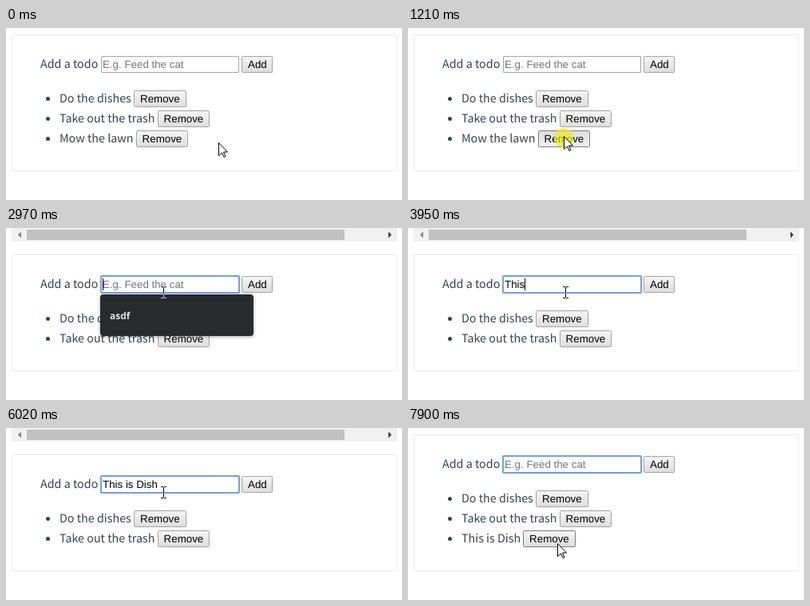
Animation of 496 by 215 pixels, one loop 8000 ms. Source, as an HTML page with a canvas:

```html
<!DOCTYPE html>
<html lang="en">
<head>
<meta charset="utf-8">
<title>Todo list demo</title>
<style>
  html, body { margin: 0; width: 100%; height: 100%; overflow: hidden; background: #fff; }
  canvas { display: block; }
</style>
</head>
<body>
<canvas id="stage" width="496" height="215"></canvas>
<script>
const ctx = document.getElementById('stage').getContext('2d');
const LOOP = 8000;
const BODY = '14.32px "Noto Sans CJK SC", "Noto Sans CJK JP", "Noto Sans", sans-serif';
const UI = '13.333px "Liberation Sans", Arial, sans-serif';
const MENU = 'bold 12px "Open Sans", "Noto Sans", sans-serif';
const INK = '#304455';
const BUTTON_W = 65.6;

const dishes = { text: 'Do the dishes', x: 160 };
const trash = { text: 'Take out the trash', x: 189.6 };
const lawn = { text: 'Mow the lawn', x: 162.6 };
const added = { text: 'This is Dish', x: 144.1 };

// Time of each keystroke and how many letters are then in the field
const TYPED = [[3300, 1], [3730, 3], [3950, 4], [4170, 5], [4390, 6], [4500, 7],
  [4610, 8], [4940, 9], [5040, 10], [5260, 11], [5590, 12]];
const REMOVED = 1310, FOCUSED = 1870, SUBMITTED = 6250;

const between = (t, a, b) => t >= a && t < b;

function write(text, x, y, font, color) {
  ctx.font = font;
  ctx.fillStyle = color;
  ctx.fillText(text, x, y);
}

function box(x, y, w, h, radius, fill, stroke) {
  ctx.beginPath();
  ctx.roundRect(x + .5, y + .5, w - 1, h - 1, radius);
  ctx.fillStyle = fill;
  ctx.fill();
  ctx.lineWidth = 1;
  ctx.strokeStyle = stroke;
  ctx.stroke();
}

function polygon(points, x, y) {
  ctx.beginPath();
  for (const [px, py] of points) ctx.lineTo(x + px, y + py);
  ctx.closePath();
}

// Pointer travel recorded as a few discrete hops along an eased line
function travel(t, start, end, hops, from, to) {
  const hop = Math.floor((t - start) / (end - start) * (hops - 1) + .01) + 1;
  const p = Math.min(Math.max(hop / hops, 0), 1);
  const eased = p * p * (3 - 2 * p);
  return from.map((v, i) => Math.round(v + (to[i] - v) * eased));
}

function pointerAt(t) {
  if (t < 100) return [266, 143];
  if (t < 1420) return travel(t, 310, 990, 7, [92, 20], [195, 135]);
  if (t < 1530) return [196, 108];
  if (t < 7120) return [197, 80];
  return travel(t, 7120, 7900, 8, [197, 80], [187, 144]);
}

function button(label, x, y, w, pointer, down) {
  const left = Math.round(x), right = Math.round(x + w);
  const hover = between(pointer[0], left, right) && between(pointer[1], y, y + 21);
  const pressed = hover && down;
  const shade = ctx.createLinearGradient(0, y, 0, y + 21);
  shade.addColorStop(0, pressed ? '#dcdcdc' : '#f6f6f6');
  shade.addColorStop(1, pressed ? '#f2f2f2' : '#dddddd');
  box(left, y, right - left, 21, 1, shade, hover ? '#7c7c7c' : '#a3a3a3');
  write(label, x + 8, y + 15, UI, '#000');
}

function scrollbar() {
  ctx.fillStyle = '#f1f1f1';
  ctx.fillRect(7, 0, 483, 17);
  ctx.fillStyle = '#c1c1c1';
  ctx.fillRect(26, 2, 398, 13);
  ctx.fillStyle = '#858585';
  polygon([[0, 0], [4, -4], [4, 4]], 15, 8.5);
  ctx.fill();
  ctx.fillStyle = '#404040';
  polygon([[0, -4], [4, 0], [0, 4]], 479, 8.5);
  ctx.fill();
}

function caretVisible(t) {
  if (t < FOCUSED) return false;
  if (t >= SUBMITTED) return Math.floor((t - SUBMITTED) / 550) % 2 === 0;
  return !between(t, 2420, 2970) && t < 6020;
}

function field(t, y) {
  const key = t < SUBMITTED && TYPED.findLast(([time]) => t >= time);
  const text = key ? added.text.slice(0, key[1]) : '';
  box(119, y, 173, 21, 0, '#fff', '#a6a6a6');
  if (t >= FOCUSED) {
    ctx.beginPath();
    ctx.roundRect(119, y, 173, 21, 1);
    ctx.lineWidth = 2;
    ctx.strokeStyle = '#719fe3';
    ctx.stroke();
  }
  write(text || 'E.g. Feed the cat', 121, y + 15, UI, text ? '#000' : '#757575');
  if (caretVisible(t)) {
    ctx.fillStyle = '#000';
    ctx.fillRect(Math.round(121 + ctx.measureText(text).width) - (text ? 0 : 0), y + 3, 1, 15);
  }
}

function suggestions() {
  ctx.save();
  ctx.shadowColor = 'rgba(0,0,0,.35)';
  ctx.shadowBlur = 4;
  ctx.shadowOffsetY = 1;
  ctx.fillStyle = '#292a2d';
  ctx.beginPath();
  ctx.roundRect(118, 83, 192, 52, 4);
  ctx.fill();
  ctx.restore();
  write('asdf', 130, 114, MENU, '#dfe0e3');
}

function spotlight(x, y) {
  ctx.fillStyle = 'rgba(238,233,28,.7)';
  ctx.beginPath();
  ctx.arc(x, y, 12, 0, 2 * Math.PI);
  ctx.fill();
}

function arrow(x, y) {
  polygon([[0, 0], [0, 16], [4, 12.5], [6.5, 18], [8.5, 17], [6, 11.5], [11, 11.5]], x + .5, y + .5);
  ctx.fillStyle = '#fff';
  ctx.fill();
  ctx.lineWidth = 1;
  ctx.strokeStyle = '#000';
  ctx.stroke();
}

// The text cursor inverts whatever lies under it
function textCursor(x, y) {
  ctx.save();
  ctx.globalCompositeOperation = 'difference';
  ctx.fillStyle = '#fff';
  ctx.fillRect(x, y - 6, 1, 13);
  for (const end of [y - 7, y + 7]) {
    ctx.fillRect(x - 3, end, 3, 1);
    ctx.fillRect(x + 1, end, 3, 1);
  }
  ctx.restore();
}

function draw(t) {
  const scrolled = between(t, REMOVED, SUBMITTED);
  const shift = scrolled ? 25 : 0;
  const items = [dishes, trash];
  if (t < REMOVED) items.push(lawn);
  if (t >= SUBMITTED) items.push(added);
  const pointer = pointerAt(t);
  const down = between(t, 1210, REMOVED);

  ctx.fillStyle = '#fff';
  ctx.fillRect(0, 0, 496, 215);
  ctx.textRendering = 'geometricPrecision';
  if (scrolled) scrollbar();
  box(7, 8 + shift, 483, 171 - shift, 1, '#fff', '#ebebeb');

  write('Add a todo', 43, 50 + shift, BODY, INK);
  field(t, 35 + shift);
  button('Add', 295, 35 + shift, 39.4, pointer, down);

  items.forEach(({ text, x }, i) => {
    const y = 78 + shift + i * 25;
    ctx.fillStyle = INK;
    ctx.beginPath();
    ctx.arc(52.5, y + 10.5, 2.5, 0, 2 * Math.PI);
    ctx.fill();
    write(text, 67, y + 15, BODY, INK);
    button('Remove', x, y, BUTTON_W, pointer, down);
  });

  if (between(t, 1990, 3300)) suggestions();
  if (down) spotlight(195, 137);
  if (between(t, 1750, 1990)) spotlight(195, 79);
  (between(t, 1530, SUBMITTED) ? textCursor : arrow)(...pointer);
}

const start = performance.now();
function tick() {
  draw((performance.now() - start) % LOOP);
  requestAnimationFrame(tick);
}
tick();
</script>
</body>
</html>
```
